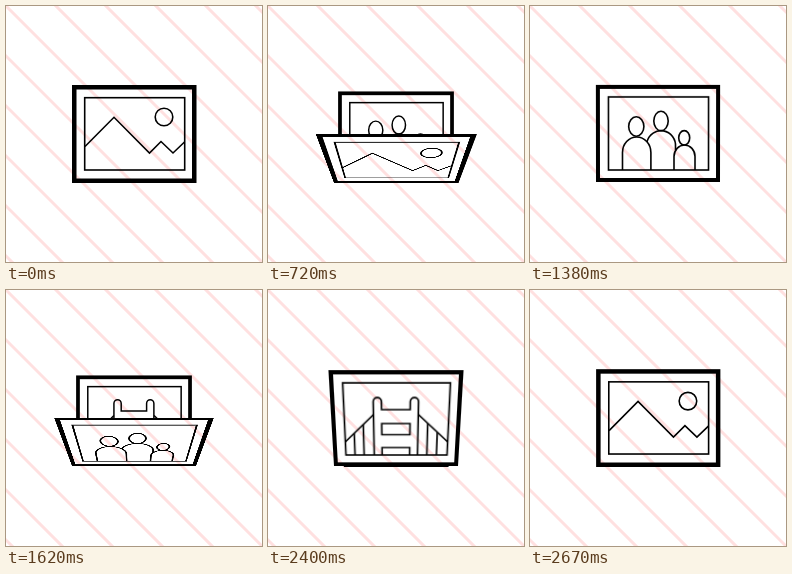
These frames come from a looping animation (256 by 256 pixels, 2700 ms). An HTML page:

```html
<!DOCTYPE html>
<html lang="en">
<head>
<meta charset="utf-8">
<title>Flipping pictures</title>
<style>
  html, body { margin: 0; width: 100%; height: 100%; overflow: hidden; background: #fff; }
  #stage { position: absolute; left: 0; top: 0; width: 256px; height: 256px; overflow: hidden; isolation: isolate; background: #fff; }
  #scene { position: absolute; inset: 0; perspective: 375px; perspective-origin: 128px 128px; }
  svg { position: absolute; left: 0; top: 0; width: 256px; height: 256px; }
  .card { fill: none; stroke: #000; stroke-width: 1.6; stroke-linejoin: miter; }
  .frame { fill: #fff; }
  #stripes { stroke: #ffe0e0; stroke-width: 3; mix-blend-mode: multiply; }
</style>
</head>
<body>
<div id="stage">
  <div id="scene">
    <svg class="card" viewBox="0 0 256 256">
      <rect class="frame" x="68.25" y="81.25" width="120" height="93.5" stroke-width="4.5"/>
      <rect x="78.7" y="91.7" width="100" height="72.3"/>
      <path d="M79 140.5 108 111.3 143.5 147 155 135.5 167 147 178.5 136"/>
      <circle cx="158" cy="111" r="8.8"/>
    </svg>
    <svg class="card" viewBox="0 0 256 256">
      <rect class="frame" x="68" y="81" width="120" height="93" stroke-width="4"/>
      <rect x="78.5" y="91" width="100" height="73"/>
      <ellipse cx="106.3" cy="120.5" rx="7.6" ry="9.7"/>
      <ellipse cx="131" cy="115" rx="7.2" ry="9.7"/>
      <ellipse cx="154.2" cy="131.8" rx="5.5" ry="7.2"/>
      <path d="M92.5 164V146.5a14.2 15.5 0 0 1 28.4 0V164"/>
      <path d="M117 136A14.5 15 0 0 1 145.5 141V144"/>
      <path d="M144 164V150.5a10.5 11.5 0 0 1 21 0V164"/>
    </svg>
    <svg class="card" viewBox="0 0 256 256">
      <rect class="frame" x="68" y="81" width="120" height="93" stroke-width="4"/>
      <rect x="78.5" y="91" width="100" height="73"/>
      <path d="M106.5 164V109a3.9 3.9 0 0 1 7.8 0V117H141.5V109a3.9 3.9 0 0 1 7.8 0V164"/>
      <path d="M114.3 131H141.5V142.5H114.3ZM114.3 164V156H141.5V164"/>
      <path d="M106.5 122 78.5 150M149.5 122 178.5 150"/>
      <path d="M87.5 141V164M96.5 132V164M158.5 131V164M168 140V164"/>
    </svg>
  </div>
  <svg id="stripes" viewBox="0 0 256 256"><path id="lines"/></svg>
</div>
<script>
  const STEP = 30, SLOT = 900, HOLD = 458, TURN = SLOT - HOLD, PITCH = 50;
  const cards = [...document.querySelectorAll('.card')];
  const bottoms = [177, 176, 176];
  const LOOP = SLOT * cards.length;

  let d = '';
  for (let i = -5; i <= 5; i++) d += `M${i * PITCH - 10} -10l280 280`;
  document.getElementById('lines').setAttribute('d', d);

  const ease = u => u < 0.5 ? 2 * u * u : 1 - 2 * (1 - u) ** 2;

  function place(i, z, transform) {
    const style = cards[i].style;
    style.display = 'block';
    style.zIndex = z;
    style.transformOrigin = `128px ${bottoms[i]}px`;
    style.transform = transform;
  }

  function draw(ms) {
    const t = Math.floor((ms % LOOP) / STEP) * STEP;
    const front = Math.floor(t / SLOT);
    const next = (front + 1) % cards.length;
    const e = ease(Math.max(0, t % SLOT - HOLD) / TURN);

    for (const card of cards) card.style.display = 'none';
    if (e > 0) place(next, 1, `scale(${0.8 + 0.2 * e})`);
    // The falling card is gone once it is nearly edge-on.
    if (e < 0.95) place(front, 2, e ? `rotateX(${-90 * e}deg)` : 'none');
  }

  const start = performance.now();
  function tick() {
    draw(performance.now() - start);
    requestAnimationFrame(tick);
  }
  draw(0);
  requestAnimationFrame(tick);
</script>
</body>
</html>
```
